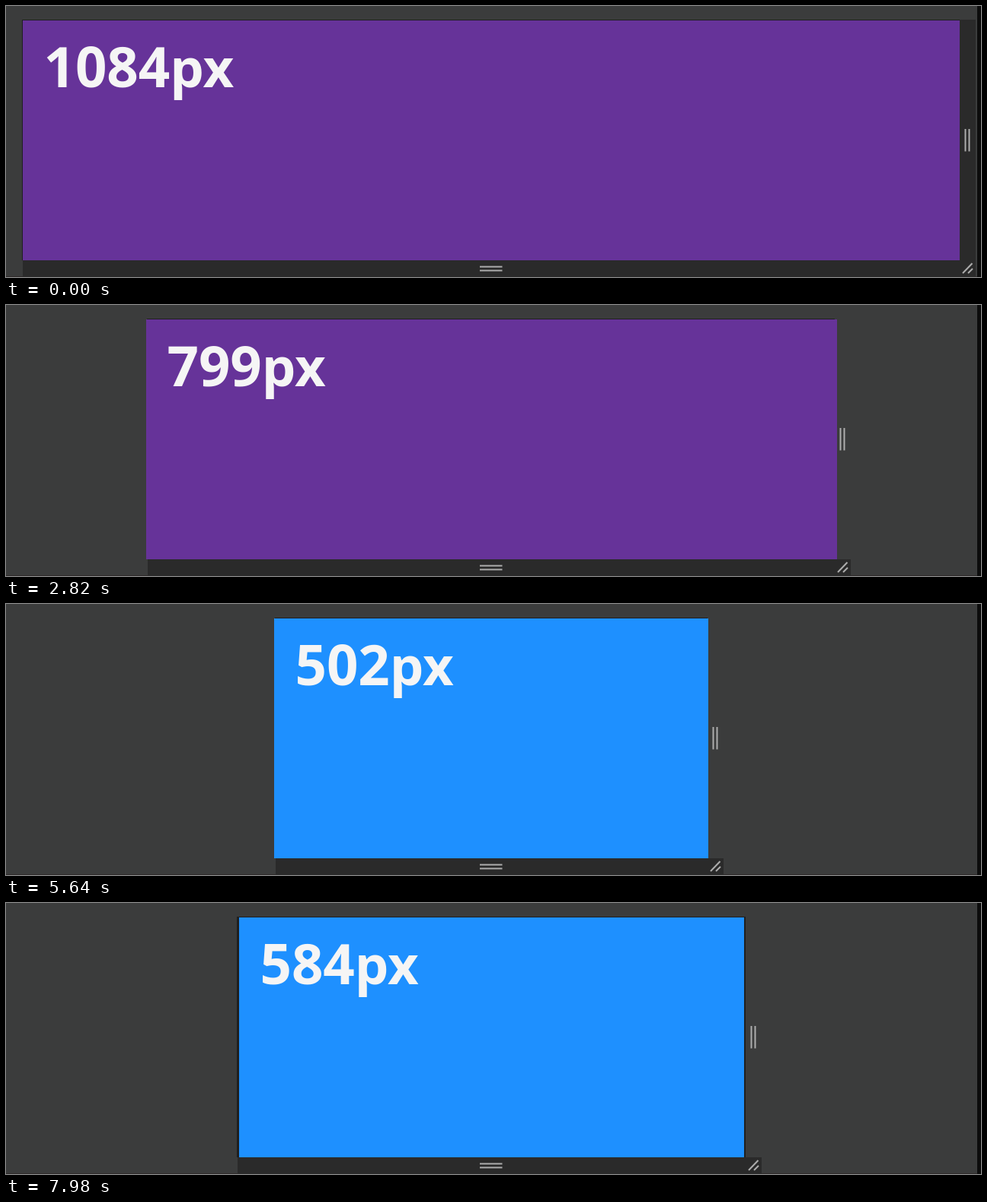
Write an HTML page with a canvas that moves like this. It is 1280x357 px and loops after 8 s.

```html
<!DOCTYPE html>
<html lang="en">
<head>
<meta charset="utf-8">
<title>Responsive viewport</title>
<style>
  html, body { margin: 0; width: 100%; height: 100%; overflow: hidden; background: #3b3c3c; }
  canvas { display: block; }
</style>
</head>
<body>
<canvas id="stage" width="1280" height="357"></canvas>
<script>
const ctx = document.getElementById('stage').getContext('2d');
const LOOP = 8000, STEP = 60, LEAD = 30;
const SCALE = 1.1338, MID = 637.3;
const TOP = 19, BOTTOM = 335, RAIL = 22;
const BREAKPOINT = 600;
const FONT = '"Open Sans", "Noto Sans", sans-serif';

// drag path: time in ms, page width in px
const DRAG = [
  [960, 1084], [1800, 905], [2520, 808], [2760, 808], [3720, 667], [4080, 633],
  [4200, 633], [4380, 622], [4500, 622], [4920, 575], [6240, 441], [6740, 441],
  [8040, 591]
];

function widthAt(t) {
  const i = DRAG.findIndex(key => key[0] >= t);
  if (i === 0) return DRAG[0][1];
  const [t0, w0] = DRAG[i - 1], [t1, w1] = DRAG[i];
  return w0 + (w1 - w0) * (t - t0) / (t1 - t0);
}

function box(color, x0, y0, x1, y1) {
  ctx.fillStyle = color;
  ctx.fillRect(x0, y0, x1 - x0, y1 - y0);
}

function line(x0, y0, x1, y1) {
  ctx.beginPath();
  ctx.moveTo(x0, y0);
  ctx.lineTo(x1, y1);
  ctx.stroke();
}

function drawGrips(right) {
  ctx.strokeStyle = '#adadad';
  ctx.lineWidth = 2;
  for (const dx of [-13.5, -8.5]) line(right + dx, 162, right + dx, 191.5);
  for (const y of [343.5, 348.5]) line(622, y, 651.5, y);
  line(right - 17, 352, right - 4.5, 339);
  line(right - 10, 352, right - 4, 346);
}

function drawLabel(width, x) {
  const digits = String(width), base = 107.3;
  ctx.fillStyle = '#f5f5f5';
  ctx.font = `bold 72.6px ${FONT}`;
  ctx.fillText(digits, x, base);
  const unitX = x + ctx.measureText(digits).width;
  ctx.font = `bold 70.5px ${FONT}`;
  ctx.fillText('px', unitX, base);
}

function draw(time) {
  const t = Math.floor((time % LOOP) / STEP) * STEP;
  const page = Math.round(widthAt(t));
  const half = page * SCALE / 2;
  const left = Math.floor(MID - half), right = Math.ceil(MID + half);

  // the resize frame runs slightly ahead of the page
  const frameHalf = widthAt(t + LEAD) * SCALE / 2;
  const frameLeft = Math.floor(MID - frameHalf);
  const frameRight = Math.floor(MID + frameHalf);
  const railRight = frameRight + RAIL;

  box('#3b3c3c', 0, 0, 1280, 357);
  box('#2e2a2a', 0, 356, 1275, 357);
  box('#0c0c0c', 1275, 0, 1280, 357);
  if (t < 120) box('#2a2a2a', frameRight, TOP - 1, railRight, BOTTOM);
  box('#2a2a2a', frameLeft, BOTTOM, railRight, 357);
  box('#1f1f1f', frameLeft - 1, TOP - 1, frameRight + 1, BOTTOM);
  box(page > BREAKPOINT ? '#663399' : '#1e90ff', left, TOP, right, BOTTOM);
  drawLabel(page, left + 27.5);
  drawGrips(railRight);
}

function tick() {
  draw(performance.now());
  requestAnimationFrame(tick);
}
tick();
</script>
</body>
</html>
```
